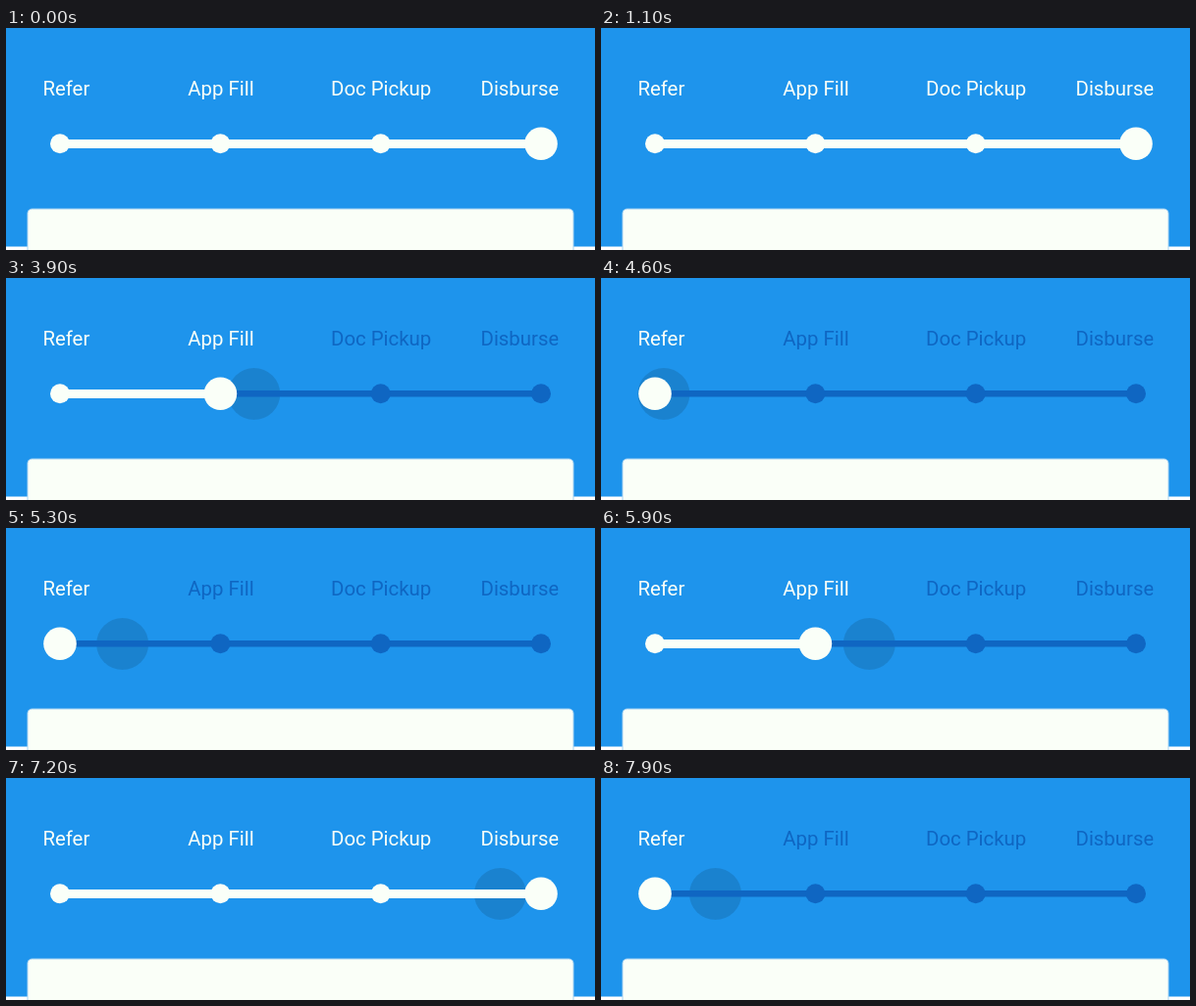
Write an HTML page that moves like this. It is 600 px wide and 227 px high and loops after 8000 ms.

```html
<!DOCTYPE html>
<html lang="en">
<head>
<meta charset="utf-8">
<title>Step slider</title>
<style>
html, body { margin: 0; width: 100%; height: 100%; overflow: hidden; }
svg { display: block; width: 600px; height: 227px; background: #1e94ec; }
text { font: 20.4px Roboto, sans-serif; }
</style>
</head>
<body>
<svg viewBox="0 0 600 227">
  <clipPath id="edge"><rect width="562.5" height="227"/></clipPath>
  <rect y="223.5" width="600" height="4" fill="#fff"/>
  <rect x="22" y="185" width="556" height="60" rx="4.5" fill="#fafff8" stroke="#a9d3f2"/>
  <g id="labels" clip-path="url(#edge)"></g>
  <circle id="touch" cy="118.5" r="26.5" fill="#000" fill-opacity=".12"/>
  <path d="M55 118.3H545" stroke="#0f66c2" stroke-width="6.5"/>
  <path id="done" stroke="#fafff8" stroke-width="9"/>
  <g id="dots"></g>
  <circle id="thumb" cy="118.3" r="16.8" fill="#fafff8"/>
</svg>
<script>
const LOOP = 8000, WHITE = '#fafff8', DARK = '#0f66c2';
const steps = [
  { name: 'Refer', x: 55, left: 37.4 },
  { name: 'App Fill', x: 218.4, left: 185.3 },
  { name: 'Doc Pickup', x: 381.7, left: 331 },
  { name: 'Disburse', x: 545, left: 483.5 }
];
// Finger path: [time in ms, x]
const path = [
  [3050, 538], [3200, 520], [3900, 253], [4100, 200], [4200, 196],
  [4600, 64], [4850, 38], [5000, 38], [5500, 172], [5900, 273],
  [6900, 552], [7020, 552], [7200, 504], [7900, 117], [8000, 70]
];
const $ = id => document.getElementById(id);

function add(parent, tag, attrs) {
  const el = document.createElementNS('http://www.w3.org/2000/svg', tag);
  for (const key in attrs) el.setAttribute(key, attrs[key]);
  return parent.appendChild(el);
}

for (const step of steps) {
  step.label = add($('labels'), 'text', { x: step.left, y: 68.5 });
  step.label.textContent = step.name;
  step.dot = add($('dots'), 'circle', { cx: step.x, cy: 118.3, r: 10 });
}

function fingerAt(t) {
  const i = path.findIndex(p => p[0] > t);
  if (i < 1) return null;
  const [t0, x0] = path[i - 1], [t1, x1] = path[i];
  return x0 + (x1 - x0) * (t - t0) / (t1 - t0);
}

function draw(t) {
  const x = fingerAt(t);
  const active = x === null ? 3 : Math.max(0, Math.min(3, Math.round((x - 55) / 163.33)));
  const thumbX = steps[active].x;
  $('touch').setAttribute('visibility', x === null ? 'hidden' : 'visible');
  $('touch').setAttribute('cx', x ?? 0);
  $('thumb').setAttribute('cx', thumbX);
  $('done').setAttribute('d', `M55 118.5H${thumbX}`);
  steps.forEach((step, i) => {
    const color = i <= active ? WHITE : DARK;
    step.label.setAttribute('fill', color);
    step.dot.setAttribute('fill', color);
  });
}

const start = performance.now();
function tick() {
  draw((performance.now() - start) % LOOP);
  requestAnimationFrame(tick);
}
tick();
</script>
</body>
</html>
```
